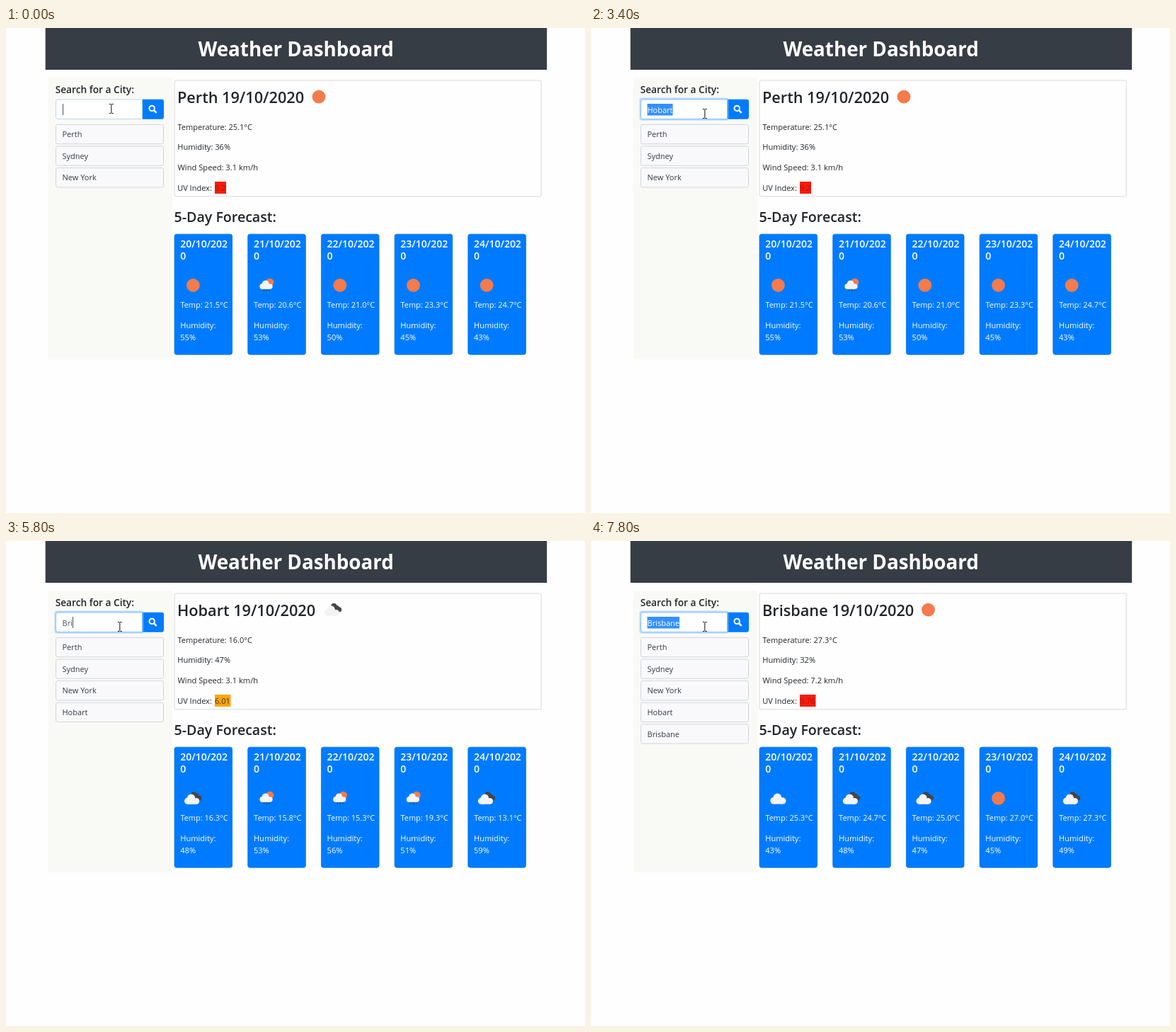
An HTML page with a canvas that plays this animation: 818 by 685 pixels, repeating every 8000 ms.

```html
<!DOCTYPE html>
<html lang="en">
<head>
<meta charset="utf-8">
<title>Weather Dashboard</title>
<style>
html, body { margin: 0; width: 100%; height: 100%; overflow: hidden; background: #fefefe; }
canvas { display: block; }
</style>
</head>
<body>
<canvas id="stage" width="818" height="685"></canvas>
<script>
const ctx = document.getElementById('stage').getContext('2d');
const LOOP = 8000;
const FAMILY = '"Open Sans", "Noto Sans", sans-serif';
const BLUE = '#007bff', INK = '#212529', RED = '#f81b0d';

const reports = {
  Perth: {
    icon: 'sun', iconX: 442, temp: '25.1', hum: 36, wind: '3.1',
    uv: '9.2', uvW: 16, uvBg: RED, uvInk: '#a8160a',
    days: [['sun', '21.5', 55], ['shower', '20.6', 53], ['sun', '21.0', 50], ['sun', '23.3', 45], ['sun', '24.7', 43]]
  },
  Hobart: {
    icon: 'broken', iconX: 462, temp: '16.0', hum: 47, wind: '3.1',
    uv: '6.01', uvW: 22.5, uvBg: '#fda410', uvInk: '#46341a',
    days: [['broken', '16.3', 48], ['shower', '15.8', 53], ['shower', '15.3', 56], ['shower', '19.3', 51], ['broken', '13.1', 59]]
  },
  Brisbane: {
    icon: 'sun', iconX: 476.5, temp: '27.3', hum: 32, wind: '7.2',
    uv: '9.76', uvW: 22.5, uvBg: RED, uvInk: '#a8160a',
    days: [['cloud', '25.3', 43], ['broken', '24.7', 48], ['broken', '25.0', 47], ['sun', '27.0', 45], ['broken', '27.3', 49]]
  }
};
const cities = ['Perth', 'Sydney', 'New York', 'Hobart', 'Brisbane'];

// [start time, value]
const typing = [
  [0, ''], [1200, 'H'], [1400, 'Ho'], [2000, 'Hob'], [2200, 'Hoba'], [2400, 'Hobar'], [2600, 'Hobart'],
  [5200, 'B'], [5600, 'Br'], [5800, 'Bri'], [6000, 'Bris'], [6200, 'Brisba'], [6400, 'Brisban'], [6600, 'Brisbane']
];
const current = [[0, 'Perth'], [4200, 'Hobart'], [7600, 'Brisbane']];
const forecast = [[0, 'Perth'], [4400, 'Hobart'], [7600, 'Brisbane']];
const listed = [[0, 3], [4200, 4], [7600, 5]];

function at(track, t) {
  let value = track[0][1];
  for (const [start, v] of track) if (t >= start) value = v;
  return value;
}

const between = (t, a, b) => t >= a && t < b;

function text(str, x, y, size, color = INK, weight = 400, align = 'left') {
  ctx.font = `${weight} ${size}px ${FAMILY}`;
  ctx.textAlign = align;
  ctx.fillStyle = color;
  ctx.fillText(str, x, y);
}

function rect(x, y, w, h, color) {
  ctx.fillStyle = color;
  ctx.fillRect(x, y, w, h);
}

function box(x, y, w, h, radius, fill, stroke, line = 1) {
  ctx.beginPath();
  ctx.roundRect(x, y, w, h, radius);
  if (fill) { ctx.fillStyle = fill; ctx.fill(); }
  if (stroke) { ctx.strokeStyle = stroke; ctx.lineWidth = line; ctx.stroke(); }
}

function disc(x, y, r, color) {
  ctx.fillStyle = color;
  ctx.beginPath();
  ctx.arc(x, y, r, 0, 7);
  ctx.fill();
}

function lines(color, width, ...segments) {
  ctx.strokeStyle = color;
  ctx.lineWidth = width;
  ctx.beginPath();
  for (const [x1, y1, x2, y2] of segments) {
    ctx.moveTo(x1, y1);
    ctx.lineTo(x2, y2);
  }
  ctx.stroke();
}

function cloud(x, y, s, color) {
  disc(x - 6 * s, y + 3 * s, 4.6 * s, color);
  disc(x - s, y - 1.2 * s, 5.6 * s, color);
  disc(x + 6.2 * s, y + 3.2 * s, 4.4 * s, color);
  rect(x - 6 * s, y + s, 12.2 * s, 6.6 * s, color);
}

const icons = {
  sun(x, y) { disc(x, y, 9.4, '#f37b4c'); },
  cloud(x, y) { cloud(x, y + 0.3, 1.05, '#f3f4f5'); },
  broken(x, y) {
    for (const k of [0, 1, 2]) disc(x + 1.2 + 3.7 * k, y - 5 + 2.3 * k, 4.1 - 0.3 * k, '#454549');
    cloud(x - 1.8, y + 0.9, 1, '#f3f3f3');
  },
  shower(x, y) {
    disc(x + 4.6, y - 4, 5.6, '#f37b4c');
    lines('#24508c', 1.3, [x - 3, y + 5, x - 4, y + 8.5], [x + 1, y + 5, x, y + 9], [x + 5, y + 5, x + 4, y + 8]);
    cloud(x - 0.6, y - 1, 0.86, '#f4f4f4');
  }
};

function drawSearch(t) {
  rect(59.7, 70, 175.3, 398, '#f9faf6');
  text('Search for a City:', 69.7, 91.5, 13.7, INK, 600);

  const focus = Math.min(1, t / 150);
  box(192.3, 100.7, 30.7, 28, [0, 3, 3, 0], BLUE);
  ctx.strokeStyle = '#fff';
  ctx.lineWidth = 2;
  ctx.beginPath();
  ctx.arc(206.2, 113.4, 3.7, 0, 7);
  ctx.stroke();
  lines('#fff', 2.5, [208.8, 116, 212.6, 119.8]);
  box(68.3, 98.6, 126.4, 32.2, 4, `rgba(128,189,255,${0.5 * focus})`);
  box(70.5, 101, 122, 27.5, [3, 0, 0, 3], '#fff', focus < 1 ? '#b5d3f2' : '#80bdff', 0.9);

  const typed = at(typing, t);
  const selected = between(t, 3400, 5200) || t >= 7200;
  ctx.font = `400 11px ${FAMILY}`;
  const width = ctx.measureText(typed).width;
  if (selected) rect(79.5, 107, width, 16.5, '#3390ff');
  text(typed, 79.5, 119.5, 11, selected ? '#fff' : '#495057');
  if (!selected && !between(t, 3000, 3400)) rect(Math.round(79.5 + width), 107, 1, 16, '#495057');

  for (let i = 0; i < at(listed, t); i++) {
    const y = 136.4 + i * 30.6;
    box(70.5, y, 152, 27.3, 2.5, '#f9f9fc', '#cfd3d8', 0.9);
    text(cities[i], 79.5, y + 17.8, 11, '#343a40');
  }
}

function drawCurrent(city) {
  const r = reports[city];
  box(238, 74, 518.3, 163.8, 3, '#fefefe', '#e4e6e8', 1.5);
  text(city + ' 19/10/2020', 242, 106, 21.7, INK, 600);
  icons[r.icon](r.iconX, 97.2);
  text(`Temperature: ${r.temp}°C`, 242.5, 143.5, 11);
  text(`Humidity: ${r.hum}%`, 242.2, 172.3, 11.1);
  text(`Wind Speed: ${r.wind} km/h`, 242.5, 201, 11.15);
  text('UV Index:', 242.2, 230, 11);
  rect(295, 217, r.uvW, 17, r.uvBg);
  text(r.uv, 295, 230, 11, r.uvInk);
}

function drawForecast(city) {
  text('5-Day Forecast:', 237.6, 273.7, 19.6, INK, 600);
  reports[city].days.forEach(([icon, temp, hum], i) => {
    const x = 238 + i * 103.7, tx = x + 8.2;
    box(x, 291.2, 81.6, 170, 3, BLUE, '#0a72dd', 0.8);
    text(`${20 + i}/10/202`, tx, 309.6, 14, '#fff', 600);
    text('0', tx, 327, 14, '#fff', 600);
    icons[icon](x + 26.4, 363.3);
    text(`Temp: ${temp}°C`, tx + 0.2, 395, 10.95, '#fff');
    text('Humidity:', tx, 423.8, 11.1, '#fff');
    text(hum + '%', tx, 441, 11.1, '#fff');
  });
}

function drawPointer(t) {
  const k = Math.max(0, Math.min(1, (t - 100) / 700));
  const e = k * k * (3 - 2 * k);
  const x = 148.8 + 12 * e, y = Math.round(114 + 7 * e);
  lines('#222', 1.1,
    [x, y - 6, x, y + 6],
    [x - 3, y - 6.5, x - 0.5, y - 6.5], [x + 0.5, y - 6.5, x + 3, y - 6.5],
    [x - 3, y + 6.5, x - 0.5, y + 6.5], [x + 0.5, y + 6.5, x + 3, y + 6.5]);
}

function draw(t) {
  rect(0, 0, 818, 685, '#fefefe');
  rect(55.7, 0, 708.5, 59, '#373d44');
  text('Weather Dashboard', 409.6, 40.4, 27.75, '#fff', 700, 'center');
  drawSearch(t);
  drawCurrent(at(current, t));
  drawForecast(at(forecast, t));
  drawPointer(t);
}

const begin = performance.now();
function frame() {
  draw((performance.now() - begin) % LOOP);
  requestAnimationFrame(frame);
}
frame();
</script>
</body>
</html>
```
